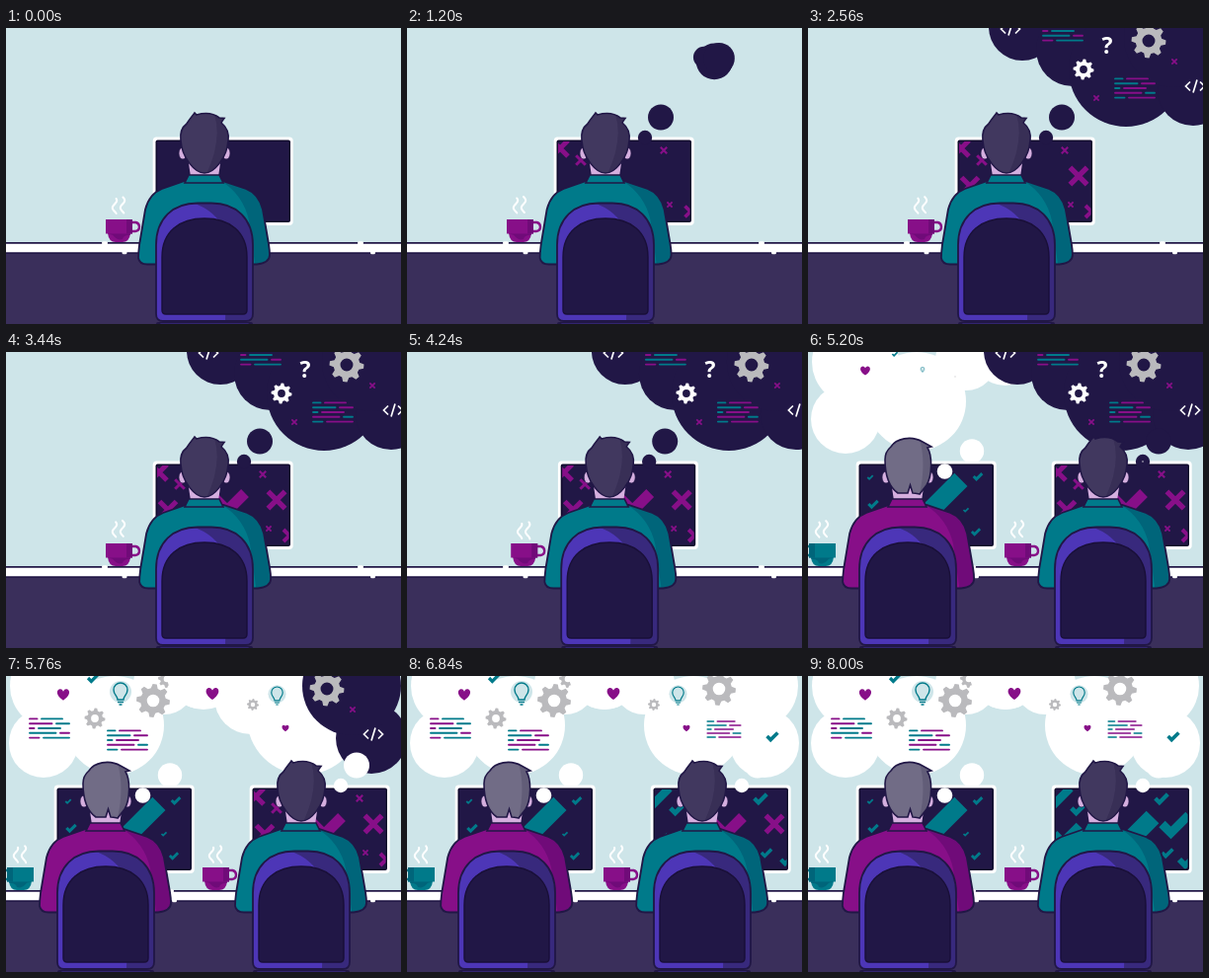
Write an HTML page with a canvas that moves like this. It is 400 by 300 pixels and loops after 8040 ms.

```html
<!DOCTYPE html>
<html lang="en">
<head>
<meta charset="utf-8">
<title>Two desks</title>
<style>
html, body { margin: 0; width: 100%; height: 100%; overflow: hidden; background: #cee5e9; }
canvas { display: block; width: 100%; height: 100%; }
</style>
</head>
<body>
<canvas id="stage"></canvas>
<script>
const LOOP = 8040;
const canvas = document.getElementById('stage');
const ctx = canvas.getContext('2d');
const INK = '#211746', SKY = '#cee5e9', FLOOR = '#3a2f5b', WHITE = '#fff';
const TEAL = '#007a8a', TEAL_DARK = '#00657a', PINK = '#870f88', PINK_DARK = '#700b79';
const SKIN = '#d5afdf', GREY = '#bababd';

const path = d => new Path2D(d);
const mix = (a, b, p) => a + (b - a) * p;
const ramp = (t, start, span = 220) => {
  const p = Math.min(1, Math.max(0, (t - start) / span));
  return p * p * (3 - 2 * p);
};

function fill(shape, color) {
  ctx.fillStyle = color;
  ctx.fill(shape);
}
function line(shape, color, width) {
  ctx.strokeStyle = color;
  ctx.lineWidth = width;
  ctx.stroke(shape);
}
function disc(x, y, r, color) {
  if (r <= 0) return;
  ctx.beginPath();
  ctx.arc(x, y, r, 0, 7);
  ctx.fillStyle = color;
  ctx.fill();
}
function box(x, y, w, h, r, color) {
  ctx.beginPath();
  ctx.roundRect(x, y, w, h, r);
  ctx.fillStyle = color;
  ctx.fill();
}
function at(x, y, scale, draw) {
  if (scale <= 0) return;
  ctx.save();
  ctx.translate(x, y);
  ctx.scale(scale, scale);
  draw();
  ctx.restore();
}
// Fill, shade the right part, then outline.
function shaded(shape, color, shadow, dark, width = 1.8) {
  fill(shape, color);
  ctx.save();
  ctx.clip(shape);
  fill(shadow, dark);
  ctx.restore();
  line(shape, INK, width);
}

// ---- Icons, each centred on 0,0 ----
const crossPath = path('M-1-1L1 1M-1 1L1-1');
const tickPath = path('M-.9 0L-.3 .6L.9-.6');
const codePath = path('M-5-4.5L-9.5 0L-5 4.5M5-4.5L9.5 0L5 4.5M2-6.5L-2 6.5');
const heartPath = path('M0 6C-9 0-7-6-3-6Q-1-6 0-3.5Q1-6 3-6C7-6 9 0 0 6Z');
const bulbPath = path('M-3 6C-3 2-7 1-7-4A7 7 0 0 1 7-4C7 1 3 2 3 6ZM-3 8.5H3M-1.5 11H1.5');

const cross = (size, width) => line(crossPath, PINK, width / size);
const tick = () => line(tickPath, TEAL, .6);
const code = () => line(codePath, WHITE, 1.7);
const heart = () => fill(heartPath, PINK);
const smallCross = () => at(0, 0, 2.7, () => cross(2.7, 1.7));
function bulb() {
  disc(0, -2, 11, SKY);
  line(bulbPath, TEAL, 1.4);
}
function gear(r, color) {
  ctx.beginPath();
  for (let i = 0; i < 32; i++) {
    const a = (i + (i % 2 ? -.12 : .12) - 1) * Math.PI / 16;
    const q = i % 4 === 1 || i % 4 === 2 ? r : r * .76;
    ctx.lineTo(Math.cos(a) * q, Math.sin(a) * q);
  }
  ctx.closePath();
  ctx.moveTo(r * .37, 0);
  ctx.arc(0, 0, r * .37, 0, 7);
  ctx.fillStyle = color;
  ctx.fill('evenodd');
}
function question() {
  ctx.fillStyle = WHITE;
  ctx.font = 'bold 23px "Open Sans", sans-serif';
  ctx.textAlign = 'center';
  ctx.fillText('?', 0, 8.5);
}
function textLines(flip) {
  const cuts = [9, 24, 6, 28, 11];
  ctx.lineCap = 'round';
  cuts.forEach((cut, i) => {
    const y = i * 4.8 - 9.6, left = (i === 3) !== flip ? TEAL : PINK;
    const right = left === TEAL ? PINK : TEAL;
    const end = [13, 20, 11, 20, 20][i];
    line(path(`M-20 ${y}H${cut - 21.5}`), left, 1.9);
    line(path(`M${cut - 17} ${y}H${end}`), right, 1.9);
  });
  ctx.lineCap = 'butt';
}

// ---- Thought clouds: x, y, radius, time it turns white ----
const puffs = [
  [217, -1, 34, 5330], [268, 22, 37, 5430], [322, 42, 58, 5530],
  [390, 63, 36, 5950], [370, 10, 50, 5850]
];
// Same order as above; the right cloud settles into its mirror image.
const leftPuffs = [
  [200, -2, 36], [160, 8, 31], [110, 50, 50], [38, 68, 35], [48, 10, 44]
];
function cloud(list, cx, cy, grow, color, keep = () => 1) {
  for (const p of list) {
    const x = mix(cx, p[0], grow * grow), y = mix(cy, p[1], grow * grow);
    disc(x, y, p[2] * grow * keep(p), color);
  }
}

function rightCloud(t, pan) {
  const x = 91 * pan - 111 * ramp(t, 4800, 520);
  const grow = ramp(t, 1050, 400), settle = ramp(t, 5850, 450);
  if (!grow) return;
  ctx.save();
  ctx.translate(x, 0);
  puffs.forEach(([px, py, r, turn], i) => {
    const [lx, ly, lr] = leftPuffs[i];
    if (t >= turn) disc(mix(px, 400 - lx - x, settle), mix(py, ly, settle), mix(r, lr, settle), WHITE);
  });
  const left = p => 1 - ramp(t, p[3], 200);
  cloud(puffs, 310, 33, grow, INK, left);
  const items = [
    [205, 1, 0, code],
    [258, 3, 1, () => textLines(false)],
    [279, 42, 1, () => gear(10.5, WHITE)],
    [303, 17, 2, question],
    [292, 71, 2, smallCross],
    [331, 61, 2, () => textLines(true)],
    [345, 13, 4, () => gear(17.5, GREY)],
    [371, 34, 4, smallCross],
    [392, 59, 3, code]
  ];
  items.forEach(([ix, iy, p, draw], i) =>
    at(ix, iy, ramp(t, 1260 + i * 45, 260) * left(puffs[p]), draw));
  ctx.restore();
}

function brightIdeas(t) {
  const items = [
    [209, 18, 5440, heart],
    [250, 29, 5500, () => gear(6, GREY)],
    [274.5, 20, 5520, () => at(0, 0, .82, bulb)],
    [283, 53, 5530, () => at(0, 0, .55, heart)],
    [321, 54, 6100, () => at(0, 0, .84, () => textLines(true))],
    [316, 13, 6200, () => gear(17, GREY)],
    [370, 61, 6350, () => at(0, 0, 6, tick)]
  ];
  for (const [x, y, start, draw] of items) at(x, y, ramp(t, start), draw);
}

function leftCloud(t, slide) {
  ctx.save();
  ctx.translate(slide, 0);
  cloud(leftPuffs, 90, 40, ramp(t, 4780, 420), WHITE);
  const items = [
    [58, 19, () => at(0, 0, .95, heart)],
    [88, 2, () => at(0, 0, 5.5, tick)],
    [116, 18, bulb],
    [149, 25, () => gear(17, GREY)],
    [90, 43, () => gear(10.5, GREY)],
    [163, 3, () => gear(9, GREY)],
    [44, 53, () => textLines(false)],
    [123, 65, () => textLines(true)]
  ];
  items.forEach(([x, y, draw], i) => at(x, y, ramp(t, 5020 + i * 50, 250), draw));
  ctx.restore();
}

// ---- Desk furniture ----
function desk() {
  box(0, 228, 400, 72, 0, FLOOR);
  box(0, 217, 400, 12, 0, INK);
  box(0, 218.7, 400, 8.6, 0, WHITE);
  for (const [x, y] of [[97, 216.3], [164, 216.3], [356, 216.3], [117.5, 226], [168, 226], [369, 226]])
    box(x, y, y < 220 ? 6 : 5, 3.2, 1.5, WHITE);
}

function cup(color, dark, mirror, t) {
  ctx.save();
  if (mirror) { ctx.translate(229, 0); ctx.scale(-1, 1); }
  line(path('M127 197H131.5Q135 198 135 201.5Q135 205.5 131 206H127'), color, 2.4);
  fill(path('M101 194H128V208.5H101Z'), color);
  fill(path('M103 208H126Q125 217 118 217H111Q104 217 103 208Z'), color);
  fill(path('M122 194H128V208.5H122Z'), dark);
  fill(path('M103 208.5H126L125.5 210Q119 209.5 118 214Q113 216 108 209.7Z'), dark);
  ctx.restore();
  // Steam curls climb inside a moving window.
  const wave = Math.sin(t / 210);
  ctx.lineCap = 'round';
  for (const x of [110, 118]) {
    const top = (x > 114 ? 171.5 : 173) + wave;
    ctx.beginPath();
    for (let y = top; y < 190 - 1.5 * (1 - wave); y++)
      ctx.lineTo(x + 2.2 * Math.sin((y - 171) * .42), y);
    ctx.strokeStyle = WHITE;
    ctx.lineWidth = 2;
    ctx.stroke();
  }
  ctx.lineCap = 'butt';
}

// x, y, cross size, cross width, cross start, tick size, tick start
const marks = [
  [155, 122, 8, 5, 900, 14, 6250], [176, 134, 4.8, 3, 940, 8, 6400],
  [164, 160, 8.5, 5.2, 1450, 14, 6650], [224, 161, 18, 11, 2750, 30, 7050],
  [260, 124, 3.2, 2.1, 940, 7, 6350], [266, 179, 2.6, 1.8, 980, 6, 6500],
  [274, 150, 8.6, 5.4, 1700, 15, 6850], [287, 186, 6, 4, 1020, 10, 6550]
];
const leftTicks = [
  [163, 127, 3], [166, 154, 5.2], [272, 126, 4.8],
  [270, 182, 4.6], [260, 160, 2.8], [227, 148, 31]
];

function monitor(draw) {
  box(148.7, 110.6, 142, 89.4, 4, WHITE);
  box(151.5, 113.5, 136.5, 83.5, 2, '#100a2c');
  ctx.save();
  ctx.beginPath();
  ctx.rect(153, 115, 133.5, 80.5);
  ctx.clip();
  box(153, 115, 134, 81, 0, INK);
  draw();
  ctx.restore();
}
function tealScreen(t) {
  for (const [x, y, size, width, start, big, turn] of marks) {
    at(x, y, size * ramp(t, start) * (1 - ramp(t, turn, 180)), () => cross(size, width));
    at(x, y, big * ramp(t, turn + 150), tick);
  }
}
function pinkScreen() {
  for (const [x, y, size] of leftTicks) at(x, y, size, tick);
}

// ---- People ----
const bodyPath = path('M181 155L158 163Q145 168 141 184L135 220Q134 228 134 233Q135 239.500 143 239.500H254Q267 238 267 230Q267 225 266 219L260 184Q256 168 243 163L219 155Z');
const bodyShade = path('M216 154Q240 168 246 195L253 245H275V154Z');
const collarPath = path('M185 149H216L220 157H181Z');
const chairPath = path('M152 220C152 193 169 177.500 194 177.500H208C233 177.500 250 193 250 220V290Q250 297 243 297H159Q152 297 152 290Z');
const chairShade = path('M184 176Q211 182 224 208L222 298H255V176Z');
const seatPath = path('M158 232C158 206 176 193 201 193C226 193 244 206 244 232V286Q244 290 240 290H162Q158 290 158 286Z');
const neckPath = path('M184 130H218L215 151H187Z');
const hairPath = path('M183 97C186 92 188 90 191 86L193 88Q207 84 216 91L221 91.500Q219 94 218 96C223 100 226 106 225 114C224 131 211 147 201 147C191 147 178 131 177 114C176 106 179 100 183 97Z');
const hairShade = path('M210 84Q220 112 203 148H230V84Z');
const greyHair = path('M184 96C189 88 204 84 216 91L225 96L221 97C226 105 226 125 220 135L213 144Q208 143 206 143L203.500 135L201 143Q196 143 191 143C181 136 178 122 178 109Q178 101 184 96Z');
const greyShade = path('M212 85Q221 112 212 148H232V85Z');
const sideFace = path('M204 108L225 106L226 129Q226 140 221 143L220 152H187L193 130Z');
const sideHair = path('M184 95C191 85 206 84 216 89L226 96L222 97L225 107Q215 112 206 110L205 119Q199 119 198 127L196 144L192 136L188 145C178 133 175 112 180 100Z');
const sideEar = path('M199 130Q195 118 203 117Q210 118 209 127Q207 137 201 135Z');
const GREY_HAIR = '#716c86', GREY_SHADE = '#625d78';

function backHead(hair, shade, color, dark) {
  fill(neckPath, SKIN);
  for (const x of [179, 223]) {
    ctx.beginPath();
    ctx.ellipse(x, 127, 4, 6, 0, 0, 7);
    ctx.fillStyle = SKIN;
    ctx.fill();
    ctx.strokeStyle = INK;
    ctx.lineWidth = .7;
    ctx.stroke();
  }
  shaded(hair, color, shade, dark, 1.6);
}
function sideHead() {
  fill(sideFace, SKIN);
  line(sideFace, INK, .8);
  shaded(sideHair, GREY_HAIR, greyShade, GREY_SHADE, 1.5);
  fill(sideEar, SKIN);
  line(sideEar, INK, .9);
}
function person(color, dark, sway, head) {
  ctx.save();
  ctx.translate(sway, 0);
  shaded(bodyPath, color, bodyShade, dark);
  ctx.restore();
  head();
  fill(collarPath, color);
  line(collarPath, INK, 1.6);
  shaded(chairPath, '#4d36b7', chairShade, '#38297d');
  fill(seatPath, INK);
  line(seatPath, '#190f38', 1.4);
  box(152, 298, 98, 4, 2, INK);
  box(156, 299.2, 90, 3, 1, '#38297d');
}

function shifted(x, draw) {
  ctx.save();
  ctx.translate(x, 0);
  draw();
  ctx.restore();
}

function render(t) {
  const pan = ramp(t, 4160, 640);
  const rightX = 98 * pan, slide = -239 * (1 - pan), leftX = slide - 100;
  const sway = (1 - Math.cos(t * Math.PI / 480)) / 2 * 1.2;

  box(0, 0, 400, 300, 0, SKY);
  desk();
  shifted(leftX, () => {
    cup(TEAL, TEAL_DARK, true, t);
    monitor(pinkScreen);
  });
  shifted(rightX, () => {
    cup(PINK, PINK_DARK, false, t);
    monitor(() => tealScreen(t));
  });

  leftCloud(t, slide);
  rightCloud(t, pan);
  brightIdeas(t);

  shifted(leftX, () => {
    disc(238.5, 121, 7.8 * ramp(t, 4440), WHITE);
    disc(266, 100.5, 12.2 * ramp(t, 4640), WHITE);
  });
  shifted(rightX, () => {
    for (const [x, y, r, start, turn] of [[241, 111, 7.2, 850, 5160], [257, 90.5, 13, 960, 5260]]) {
      const white = ramp(t, turn);
      if (white < 1) disc(x, y, r * ramp(t, start), INK);
      disc(x, y, r * white, WHITE);
    }
  });

  shifted(leftX, () => person(PINK, PINK_DARK, sway, () => {
    if (t < 5080) sideHead();
    else backHead(greyHair, greyShade, GREY_HAIR, GREY_SHADE);
  }));
  shifted(rightX, () => person(TEAL, TEAL_DARK, sway, () =>
    backHead(hairPath, hairShade, '#41385f', '#382f56')));
}

function fit() {
  const ratio = window.devicePixelRatio || 1;
  canvas.width = Math.round(innerWidth * ratio);
  canvas.height = Math.round(innerHeight * ratio);
}
window.addEventListener('resize', fit);
fit();

const begin = performance.now();
function play() {
  const t = (performance.now() - begin) % LOOP;
  ctx.setTransform(canvas.width / 400, 0, 0, canvas.height / 300, 0, 0);
  render(Math.floor(t / 40) * 40);
  requestAnimationFrame(play);
}
play();
</script>
</body>
</html>
```
